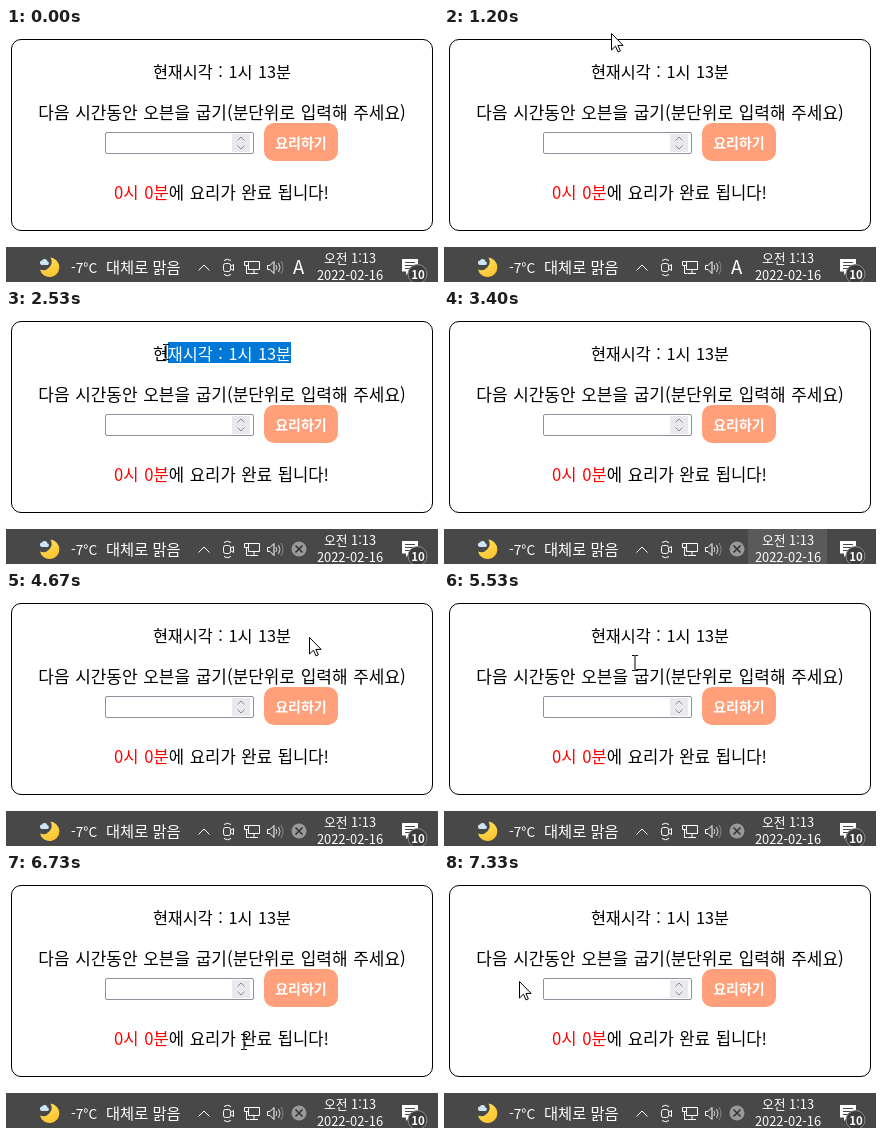
Write an HTML page that moves like this. It is 432 px wide and 254 px high and loops after 8000 ms.

```html
<!DOCTYPE html>
<html lang="ko">
<head>
<meta charset="utf-8">
<title>오븐 타이머</title>
<style>
  html, body { margin: 0; width: 100%; height: 100%; overflow: hidden; background: #fff; }
  svg { display: block; width: 432px; height: 254px; }
  text { font-family: "Noto Sans CJK KR", "Noto Sans CJK", "Noto Sans", sans-serif; white-space: pre; }
  .mid { text-anchor: middle; }
  .copy { word-spacing: 1px; }
  .bar text { fill: #fff; }
  .line { fill: none; stroke: #fff; }
  .hover { fill: #5a5a5a; }
</style>
</head>
<body>
<svg viewBox="0 0 432 254">
  <defs>
    <linearGradient id="moon" x1="0" y1="0" x2="0.6" y2="1">
      <stop offset="0" stop-color="#ffe566"/>
      <stop offset="1" stop-color="#fcc42f"/>
    </linearGradient>
    <clipPath id="clip"><rect id="clipBox" y="32" height="21"/></clipPath>
  </defs>

  <rect x="5.5" y="11.5" width="421" height="191" rx="9.5" fill="#fff" stroke="#000"/>
  <text id="time" class="mid copy" x="216" y="49.5" font-size="16.3">현재시각 : 1시 13분</text>
  <g clip-path="url(#clip)">
    <rect y="32" width="432" height="21" fill="#0078d7"/>
    <text class="mid copy" x="216" y="49.5" font-size="16.3" fill="#fff">현재시각 : 1시 13분</text>
  </g>
  <text class="mid copy" x="216" y="90.5" font-size="16.95">다음 시간동안 오븐을 굽기(분단위로 입력해 주세요)</text>
  <text class="mid copy" x="215.5" y="170.5" font-size="16.65"><tspan fill="#f00">0시 0분</tspan>에 요리가 완료 됩니다!</text>

  <rect id="field" x="99.5" y="104.5" width="148" height="21" rx="1.5" fill="#fff" stroke="#8f8f9d"/>
  <rect x="226" y="106" width="18" height="18" fill="#e9e9ed"/>
  <path d="M231.500 112.500l3.500-3.500 3.500 3.500M231.500 117.500l3.500 3.500 3.500-3.500" fill="none" stroke="#8a8a92"/>
  <rect x="258" y="95" width="74" height="38" rx="10" fill="#ffa07a"/>
  <text class="mid" x="295" y="119.5" font-size="14" font-weight="700" fill="#fff">요리하기</text>

  <g class="bar">
    <rect y="219" width="432" height="35" fill="#484848"/>
    <rect id="clock" class="hover" x="304" y="219" width="79" height="50"/>
    <rect id="notes" class="hover" x="383" y="219" width="41" height="50"/>

    <path d="M44.500 229.500A9.800 9.800 0 1 1 34 241.500A8.500 8.500 0 0 0 44.500 229.500z" fill="url(#moon)"/>
    <path d="M35.500 237a2.300 2.300 0 0 1 .5-4.500a3 3 0 0 1 5.500 1a1.800 1.800 0 0 1 0 3.500z" fill="#cfe4f2"/>
    <text x="65" y="244.5" font-size="13.7">-7°C</text>
    <text x="100" y="244.5" font-size="15.3">대체로 맑음</text>

    <g class="line">
      <path d="M192.500 242.500l5.500-5.500 5.500 5.500"/>
      <rect x="217.5" y="235.5" width="7" height="8" rx="2"/>
      <path d="M224.500 238.500l3-2v6l-3-2M218 232.500q3.500-2.500 7 0M218 246.500q3.500 2.500 7 0"/>
      <path d="M242.500 233.500h11v8h-11zM248 241.500v4M244 245.500h8M238.500 233.500h4v4h-4zM240.500 237.500v8h3"/>
      <path d="M261.500 237.500h2.500l4-4v12l-4-4h-2.500z"/>
      <path d="M270 237q1.500 2.500 0 5M272.500 235q3 4.500 0 9" stroke="#ddd"/>
      <path d="M275 233q4 6.500 0 13" stroke="#888"/>
    </g>
    <text id="ime" class="mid" x="292.5" y="246" font-size="18.5">A</text>
    <g id="off">
      <circle cx="293" cy="239" r="7.5" fill="#999"/>
      <path d="M289.500 235.500l7 7M296.500 235.500l-7 7" stroke="#333" stroke-width="1.6"/>
    </g>

    <text class="mid" x="344" y="234.5" font-size="12.8">오전 1:13</text>
    <text class="mid" x="344" y="252" font-size="12.9">2022-02-16</text>

    <path d="M396 231h16v12.500h-8.500l-3.500 3.500v-3.500h-4z" fill="#fff"/>
    <path d="M399 234.500h10M399 237.500h10M399 240.500h6" stroke="#484848"/>
    <circle cx="411.5" cy="246" r="9.5" fill="#3c3c3c" stroke="#8c8c8c"/>
    <text class="mid" x="412" y="250.5" font-size="11.5" font-weight="700">10</text>
  </g>

  <path id="arrow" d="M.5.5V17l4-3.800 2.500 5.700 2.300-1-2.400-5.500h5.200z" fill="#fff" stroke="#000"/>
  <path id="beam" d="M-3-7.500h2.500l.5.500.5-.5H3M0-7V7M-3 7.500h2.500l.5-.5.5.5H3" fill="none" stroke="#000"/>
</svg>
<script>
  const LOOP = 8000, FPS = 15, TRAY_SWAP = 2400;
  const DRAGS = [[1900, 2800], [4730, 5330]];

  // Turning points of the pointer: time, x, y
  const STOPS = [
    [1200, 167, 5], [1330, 421, 84], [1400, 421, 84], [1530, 390, 100],
    [1900, 286, 43], [2530, 160, 42], [2730, 160, 42],
    [3400, 348, 260], [3670, 342, 242], [4470, 301, 64],
    [4670, 303, 45], [4730, 303, 45], [5130, 157, 42], [5400, 157, 42],
    [6270, 383, 235], [7130, 112, 110], [7330, 75, 107]
  ];

  const el = id => document.getElementById(id);
  const show = (id, on) => { el(id).style.display = on ? "" : "none"; };
  const inside = (p, b) => p.x >= b.x && p.x < b.x + b.width && p.y >= b.y && p.y < b.y + b.height;

  // Hover areas and letter edges come from the layout itself
  const box = {};
  for (const id of ["time", "field", "clock", "notes"]) box[id] = el(id).getBBox();
  const texts = [...document.querySelectorAll(".copy")].map(n => n.getBBox()).concat(box.field);
  const textEnd = Math.round(box.time.x + box.time.width);
  const edges = Array.from({ length: el("time").getNumberOfChars() },
    (_, i) => Math.round(el("time").getStartPositionOfChar(i).x));

  function pointer(t) {
    const next = STOPS.findIndex(s => s[0] > t);
    const b = STOPS.at(next);
    const a = next > 0 ? STOPS[next - 1] : b;
    const f = a === b ? 0 : (t - a[0]) / (b[0] - a[0]);
    const mix = i => Math.round(a[i] + (b[i] - a[i]) * f);
    return { x: mix(1), y: mix(2) };
  }

  function draw(now) {
    const step = Math.floor((now % LOOP + 4) * FPS / 1000);
    const t = Math.round(step * 100 / FPS) * 10 % LOOP;
    const p = pointer(t);
    const visible = t >= STOPS[0][0];
    const drag = p.x < textEnd && DRAGS.some(([from, to]) => t >= from && t < to);
    const beam = drag || texts.some(b => inside(p, b));
    const over = id => visible && inside(p, box[id]);

    show("arrow", visible && !beam);
    show("beam", visible && beam);
    for (const id of ["arrow", "beam"]) el(id).setAttribute("transform", `translate(${p.x} ${p.y})`);

    const nearer = (a, b) => Math.abs(b - p.x) < Math.abs(a - p.x) ? b : a;
    const start = drag ? edges.reduce(nearer, textEnd) : textEnd;
    el("clipBox").setAttribute("x", start);
    el("clipBox").setAttribute("width", textEnd - start);

    show("clock", over("clock"));
    show("notes", over("notes"));
    el("field").setAttribute("stroke", over("field") ? "#676774" : "#8f8f9d");
    show("ime", t < TRAY_SWAP);
    show("off", t >= TRAY_SWAP);
  }

  function tick() {
    draw(performance.now());
    requestAnimationFrame(tick);
  }
  tick();
</script>
</body>
</html>
```
